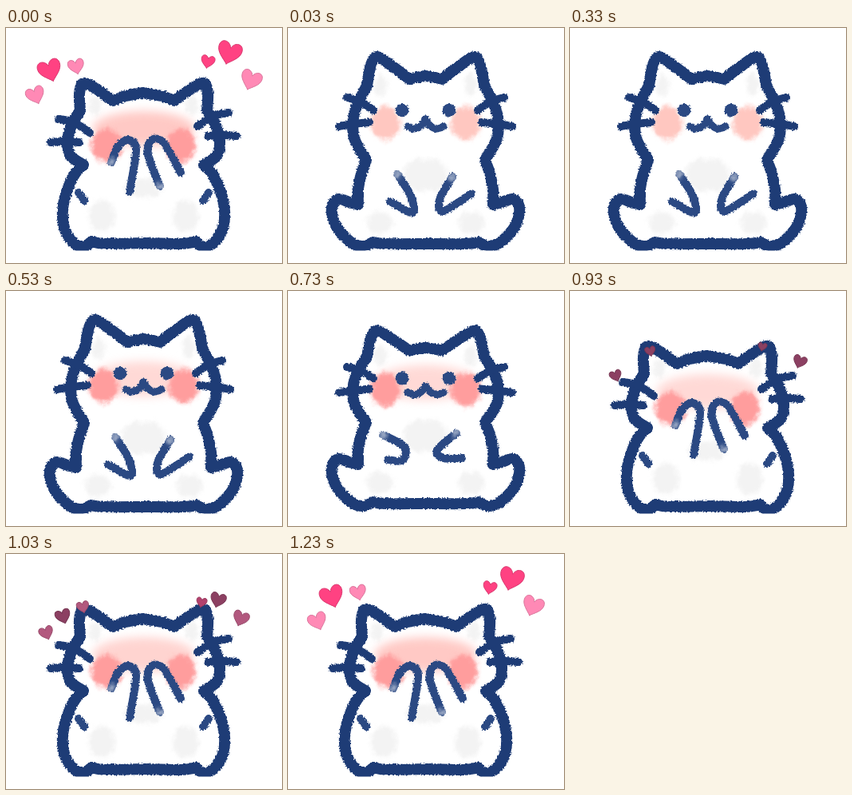
Animation, 346 px wide and 294 px high, one loop 1490 ms. Source, as an HTML page:

```html
<!DOCTYPE html>
<html lang="en">
<head>
<meta charset="utf-8">
<title>Shy cat</title>
<style>
html, body { margin: 0; width: 100%; height: 100%; overflow: hidden; background: #fff; }
svg { display: block; width: 100vw; height: 100vh; }
path { fill: none; stroke-linecap: round; stroke-linejoin: round; }
filter { color-interpolation-filters: sRGB; }
</style>
</head>
<body>
<svg id="stage" viewBox="0 0 346 294" xmlns="http://www.w3.org/2000/svg">
  <defs>
    <filter id="rough" filterUnits="userSpaceOnUse" x="0" y="0" width="346" height="294">
      <feTurbulence type="fractalNoise" baseFrequency=".5" numOctaves="2" seed="4"/>
      <feDisplacementMap in="SourceGraphic" scale="4" xChannelSelector="R" yChannelSelector="G"/>
      <feGaussianBlur stdDeviation=".4"/>
    </filter>
    <filter id="chalk" filterUnits="userSpaceOnUse" x="0" y="0" width="346" height="294">
      <feGaussianBlur in="SourceGraphic" stdDeviation="2.5" result="b"/>
      <feTurbulence type="fractalNoise" baseFrequency=".12" numOctaves="2" seed="9"/>
      <feDisplacementMap in="b" scale="8" xChannelSelector="R" yChannelSelector="G"/>
    </filter>
    <filter id="haze" filterUnits="userSpaceOnUse" x="0" y="0" width="346" height="294">
      <feGaussianBlur stdDeviation="6"/>
    </filter>
    <clipPath id="floor"><rect width="346" height="278.5"/></clipPath>
  </defs>
</svg>
<script>
const NS = 'http://www.w3.org/2000/svg';
const stage = document.getElementById('stage');
const NAVY = '#1e3c76', INK = '#2b4983';
const AXIS = 172.5;
const LOOP = 1490;

function add(parent, tag, attrs = {}) {
  const el = document.createElementNS(NS, tag);
  for (const k in attrs) el.setAttribute(k, attrs[k]);
  return parent.appendChild(el);
}

const layer = (parent, filter, attrs) => add(parent, 'g', { filter: `url(#${filter})`, ...attrs });
const same = p => p;
const mirror = ([x, y]) => [2 * AXIS - x, y];
const points = text => text.trim().split(/\s+/).map(s => s.split(',').map(Number));

// Smooth curve through points; "/" marks a corner.
function curve(text, map = same) {
  let d = '', last = null;
  for (const part of text.split('/')) {
    const p = points(part).map(map);
    if (last) p.unshift(last);
    else d = 'M' + p[0];
    for (let i = 0; i < p.length - 1; i++) {
      const a = p[i - 1] || p[i], b = p[i], c = p[i + 1], e = p[i + 2] || c;
      const c1 = b.map((v, j) => v + (c[j] - a[j]) / 6);
      const c2 = c.map((v, j) => v - (e[j] - b[j]) / 6);
      d += `C${c1} ${c2} ${c}`;
    }
    last = p[p.length - 1];
  }
  return d;
}

const stroke = (parent, d, color, width) =>
  add(parent, 'path', { d, stroke: color, 'stroke-width': width });

const oval = (parent, [cx, cy], rx, ry) => add(parent, 'ellipse', { cx, cy, rx, ry });

// Only the left half is described; the right half is its mirror image.
function drawPose({ body, whiskers, mouth, eye, limbs, marks = [], shade, cheek, bandLift, lift = 0, warp = same }) {
  const root = add(stage, 'g', { 'clip-path': 'url(#floor)' });
  const left = p => warp(p);
  const right = p => mirror(warp(p));
  const raised = p => { const [x, y] = right(p); return [x, y - lift]; };

  const grey = layer(root, 'chalk', { fill: '#f3f3f3' });
  const band = layer(root, 'haze', { fill: '#ffc4bf' });
  const cheeks = layer(root, 'chalk');
  const ink = layer(root, 'rough');
  const face = layer(root, 'rough', { fill: INK });
  const fade = layer(root, 'chalk', { fill: '#fff', opacity: .55 });

  oval(band, [AXIS, warp(cheek)[1] - bandLift], 64, 22);
  for (const side of [left, right]) {
    for (const [x, y, rx, ry] of shade) oval(grey, side([x, y]), rx, ry);
    oval(cheeks, side(cheek), 19, 21);
    stroke(ink, curve(body, side), NAVY, 14);
    for (const w of whiskers) stroke(ink, curve(w, side === right ? raised : left), NAVY, 10);
    for (const m of marks) stroke(face, curve(m, side), INK, 10);
    if (mouth) stroke(face, curve(mouth, side), INK, 9);
    if (eye) oval(face, side(eye), 8.3, 8.3);
  }
  for (const limb of limbs) {
    stroke(face, curve(limb), INK, 10);
    oval(fade, points(limb)[0], 6, 5);
  }
  return { root, band, cheeks };
}

const sitting = {
  body: `172.5,60 160,62 152,64 / 131,48 112,36 104,46 99,72 / 88,93 82,112 83,138 98,165
    / 92,182 88,202 88,221 / 77,218 63,214 55,224 58,243 67,257 82,270 95,273 106,268 / 122,270 172.5,270`,
  whiskers: ['74,87 91,92 107,103', '64,123 82,120 102,118'],
  mouth: '172,114 167,122 158,126 150,123',
  eye: [143, 103],
  limbs: ['137,183 154,210 156,231 128,217', '206,186 190,215 195,229 230,207'],
  shade: [[116, 71, 8, 14], [165, 184, 20, 20], [115, 244, 16, 14]],
  cheek: [122, 119],
  bandLift: 9
};
const sit = drawPose(sitting);

const squash = drawPose({
  ...sitting,
  limbs: ['119,180 146,195 143,212 125,211', '211,178 187,199 195,209 218,209'],
  warp: ([x, y]) => [x, y + Math.max(-4, (160 - y) * .11)]
});

const hide = drawPose({
  body: `172.5,81 150,85 134,91 / 113,76 97,69 92,82 93,103 / 82,122 77,142 81,160 97,171
    / 86,183 76,205 71,228 73,250 83,267 97,274 107,267 / 125,270 172.5,269`,
  whiskers: ['66,114 85,118 105,131', '56,143 72,142 92,143'],
  limbs: ['132,168 140,149 153,140 163,152 155,205', '193,198 178,158 183,140 198,144 219,181'],
  marks: ['91,206 98,216'],
  shade: [[112, 97, 8, 12], [165, 200, 16, 12], [120, 235, 16, 20]],
  cheek: [126, 147],
  bandLift: 21,
  lift: 8
});

// Resting x, y, width, colour and delay
const HOT = [255, 66, 130], PALE = [255, 137, 181], DUSK = [140, 64, 98];
const heartLayer = add(stage, 'g');
const hearts = [
  [55, 53, 29, HOT, 1 / 3],
  [88, 48, 20, PALE, 0],
  [37, 84, 23, PALE, 0],
  [253, 42, 17, HOT, 0],
  [280, 31, 30, HOT, 1 / 3],
  [307, 65, 26, PALE, 0]
].map(([x, y, size, color, delay]) => ({
  x, y, size, color, delay,
  el: add(heartLayer, 'path', {
    d: 'M0,.48C-.2,.28 -.5,.1 -.5,-.18C-.5,-.52 -.1,-.52 0,-.2C.1,-.52 .5,-.52 .5,-.18C.5,.1 .2,.28 0,.48Z',
    'stroke-width': 1, 'vector-effect': 'non-scaling-stroke'
  })
}));

const mix = (a, b, k) => a + (b - a) * k;
const show = (el, on) => { el.style.display = on ? '' : 'none'; };

// Each heart flies outwards from a point low in the belly.
function placeHearts(progress) {
  for (const { x, y, size, color, delay, el } of hearts) {
    const k = (progress - delay) / (1 - delay);
    show(el, k > -.01);
    const dx = x - AXIS, dy = y - 230;
    const back = 30 * (1 - k) / Math.hypot(dx, dy);
    const tint = color.map((v, i) => mix(DUSK[i], v, k));
    el.setAttribute('transform',
      `translate(${x - dx * back} ${y - dy * back}) rotate(${dx * .15}) scale(${size * mix(.65, 1, k)})`);
    el.style.fill = `rgb(${tint.map(Math.round)})`;
    el.style.stroke = `rgb(${tint.map(v => Math.round(v * .85))})`;
  }
}

// Start time, pose, blush
const steps = [[0, hide, 1], [30, sit, 0], [530, sit, .7], [730, squash, .7], [930, hide, .7]];

function render() {
  const t = performance.now() % LOOP;
  const [, pose, base] = steps.filter(s => s[0] <= t).pop();
  const bloom = t < 30 ? 1 : Math.min(1, Math.max(0, Math.floor((t - 930) / 100) / 3));
  const blush = pose === hide ? mix(base, 1, bloom) : base;

  for (const p of [sit, squash, hide]) show(p.root, p === pose);
  pose.band.setAttribute('opacity', blush * .9);
  pose.cheeks.setAttribute('fill', blush ? '#ff9d9d' : '#ffc7c0');
  show(heartLayer, pose === hide);
  placeHearts(bloom);
  requestAnimationFrame(render);
}
render();
</script>
</body>
</html>
```
